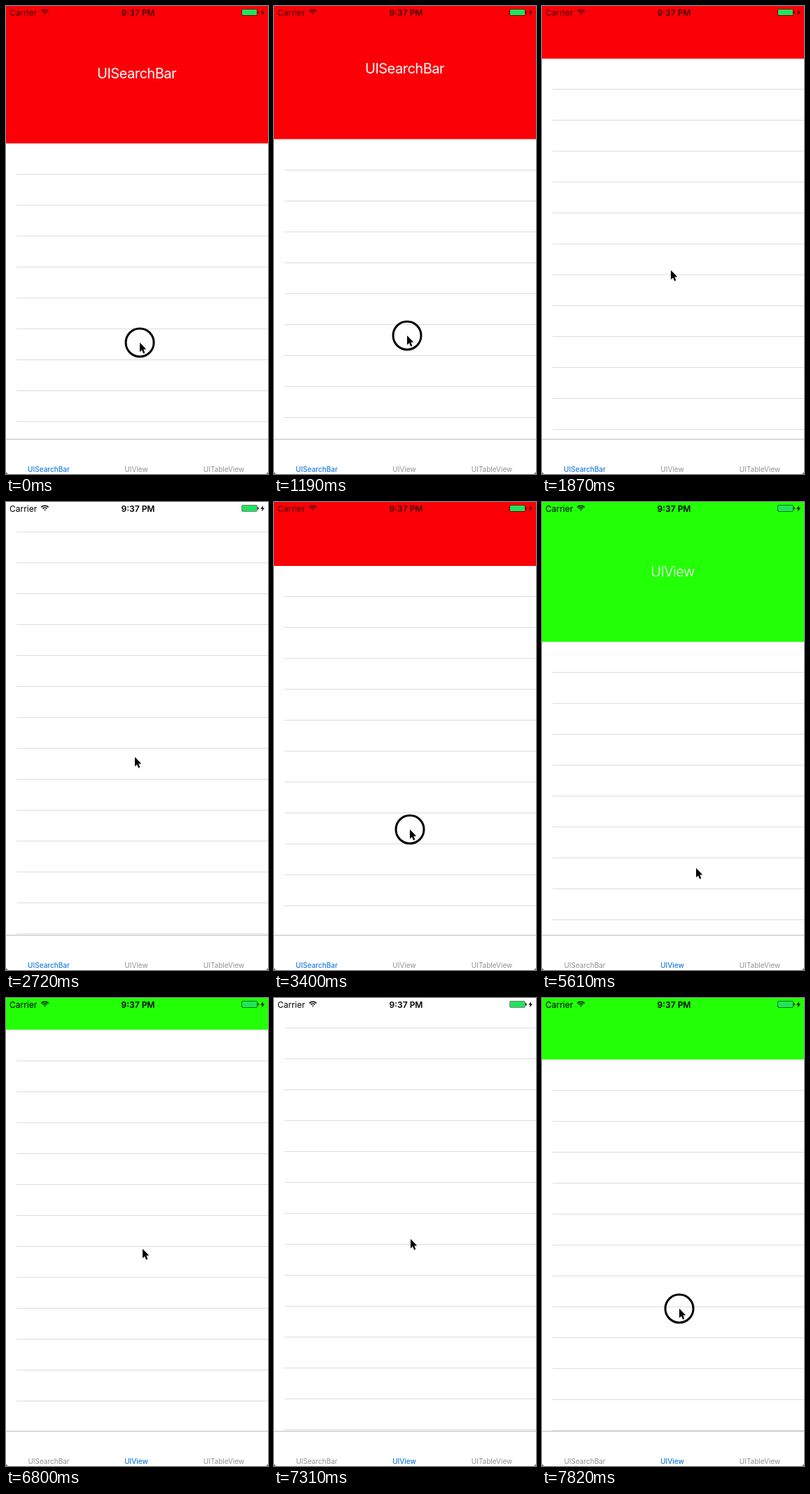
An HTML page with a canvas that plays this animation: 374 px wide and 666 px high, repeating every 7.99 s.

```html
<!DOCTYPE html>
<html lang="en">
<head>
<meta charset="utf-8">
<title>Scrolling header demo</title>
<style>
  html, body { margin: 0; width: 100%; height: 100%; overflow: hidden; background: #fff; }
  canvas { display: block; }
</style>
</head>
<body>
<canvas id="stage" width="374" height="666"></canvas>
<script>
const ctx = document.getElementById('stage').getContext('2d');
const LOOP = 7990, STEP = 170, COAST = 680, TAB_SWITCH = 5100;
const WIDTH = 374, HEIGHT = 666, TAB_TOP = 616, ROW = 44;
const HIDDEN = -1, OPEN = 199;
const FONT = 'Inter, Roboto, sans-serif';

const tabs = [
  { label: 'UISearchBar', x: 61, header: '#fb0007', ink: 'rgba(0,0,0,.7)', weight: 400 },
  { label: 'UIView', x: 186, header: '#22ff06', ink: '#000', weight: 300 },
  { label: 'UITableView', x: 311 }
];

// Each gesture moves the pointer and the header's bottom edge; a zero-length one only hovers.
const gestures = [
  { start: 0, end: 1700, from: [191, 479], to: [184, 377], header: [195.5, 134], power: 6.5 },
  { start: 2720, end: 4080, from: [184, 363], to: [204, 569], header: [HIDDEN, 183] },
  { start: 4930, end: 5100, from: [186, 645], to: [186, 645], header: [OPEN, OPEN] },
  { start: 5610, end: 5610, from: [220, 521], to: [220, 521], header: [OPEN, OPEN] },
  { start: 6120, end: 6630, from: [205, 468], to: [195, 360], header: [OPEN, 81] },
  { start: 7310, end: LOOP, from: [195, 343], to: [196, 475], header: [HIDDEN, 117] }
];

const mix = (a, b, p) => a + (b - a) * p;
const mixPoint = (a, b, p) => a.map((value, i) => Math.round(mix(value, b[i], p)));
const easeOut = p => 1 - (1 - p) ** 2;
const easeInOut = p => p * p * (3 - 2 * p);

function poseAt(time) {
  const index = gestures.findLastIndex(gesture => gesture.start <= time);
  const { start, end, from, to, header, power = 1 } = gestures[index];
  if (time < end) {
    const p = ((time - start) / (end - start)) ** power;
    const touching = time > start || start === 0;
    return { pointer: mixPoint(from, to, p), bottom: mix(...header, p), touching };
  }
  // After release the list coasts and the pointer drifts to the next gesture.
  const next = gestures[index + 1];
  const drift = easeInOut((time - end) / (next.start - end));
  const coast = easeOut(Math.min(1, (time - end) / COAST));
  return {
    pointer: mixPoint(to, next.from, drift),
    bottom: mix(header[1], next.header[0], coast),
    touching: false
  };
}

function rect(x, y, w, h, color) {
  ctx.fillStyle = color;
  ctx.fillRect(x, y, w, h);
}

function text(label, x, y, size, weight, color, align = 'center', spacing = 0) {
  ctx.font = `${weight} ${size}px ${FONT}`;
  ctx.letterSpacing = spacing + 'px';
  ctx.textAlign = align;
  ctx.fillStyle = color;
  ctx.fillText(label, x, y);
}

function polygon(points, fill) {
  ctx.beginPath();
  points.forEach(([x, y]) => ctx.lineTo(x, y));
  ctx.closePath();
  ctx.fillStyle = fill;
  ctx.fill();
}

function drawStatusBar(ink) {
  text('Carrier', 5, 13.5, 12, 400, ink, 'left');
  text('9:37 PM', 188.5, 13.5, 12, 600, ink);

  ctx.strokeStyle = ink;
  ctx.lineWidth = 1.6;
  for (const radius of [1.2, 4.3, 7.2]) {
    ctx.beginPath();
    ctx.arc(55.5, 12.5, radius, -Math.PI * .75, -Math.PI * .25);
    ctx.stroke();
  }

  rect(337, 5, 21, 8, '#20e45f');
  ctx.strokeStyle = 'rgba(0,0,0,.5)';
  ctx.lineWidth = 1;
  ctx.beginPath();
  ctx.roundRect(336.5, 4.5, 22, 9, 1.5);
  ctx.stroke();
  rect(359, 7.5, 1.5, 3, ink);
  polygon([[367, 5], [363.5, 9.8], [365.8, 9.8], [364.8, 13.5], [369, 8.4], [366.6, 8.4]], ink);
}

function drawTabBar(selected) {
  rect(0, TAB_TOP, WIDTH, HEIGHT - TAB_TOP, '#fff');
  rect(0, TAB_TOP, WIDTH, 1, '#bdbdbd');
  for (const tab of tabs) {
    const active = tab === selected;
    text(tab.label, tab.x, 662.5, 10, active ? 500 : 400, active ? '#1c7ce0' : '#929292');
  }
  for (const x of [0, WIDTH]) {
    polygon([[x, HEIGHT - 3], [x, HEIGHT], [Math.abs(x - 3), HEIGHT]], '#777');
  }
}

function drawPointer([x, y], touching) {
  if (touching) {
    ctx.beginPath();
    ctx.arc(x, y, 20, 0, Math.PI * 2);
    ctx.strokeStyle = '#000';
    ctx.lineWidth = 3;
    ctx.stroke();
  }
  ctx.save();
  ctx.translate(x, y);
  ctx.shadowColor = 'rgba(0,0,0,.3)';
  ctx.shadowBlur = 1.5;
  ctx.shadowOffsetY = 1;
  polygon([[0, 0], [0, 13], [3, 10.2], [5.2, 15.2], [7.2, 14.3], [5.1, 9.5], [9, 9.2]], '#000');
  ctx.restore();
}

function draw(time) {
  const tab = tabs[time < TAB_SWITCH ? 0 : 1];
  const { pointer, bottom, touching } = poseAt(time);
  rect(0, 0, WIDTH, HEIGHT, '#fff');
  for (let y = Math.round(bottom + 43.4); y < TAB_TOP; y += ROW) rect(15, y, WIDTH - 15, 1, '#dcdcdc');
  if (bottom > 0) {
    rect(0, 0, WIDTH, bottom, tab.header);
    text(tab.label, 186.5, Math.round(bottom) - 93, 20, tab.weight, '#fff', 'center', -.5);
  }
  drawStatusBar(bottom > 12 ? tab.ink : '#000');
  drawTabBar(tab);
  drawPointer(pointer, touching);
}

function tick() {
  const time = performance.now() % LOOP;
  draw(Math.floor(time / STEP) * STEP);
  requestAnimationFrame(tick);
}
tick();
</script>
</body>
</html>
```
